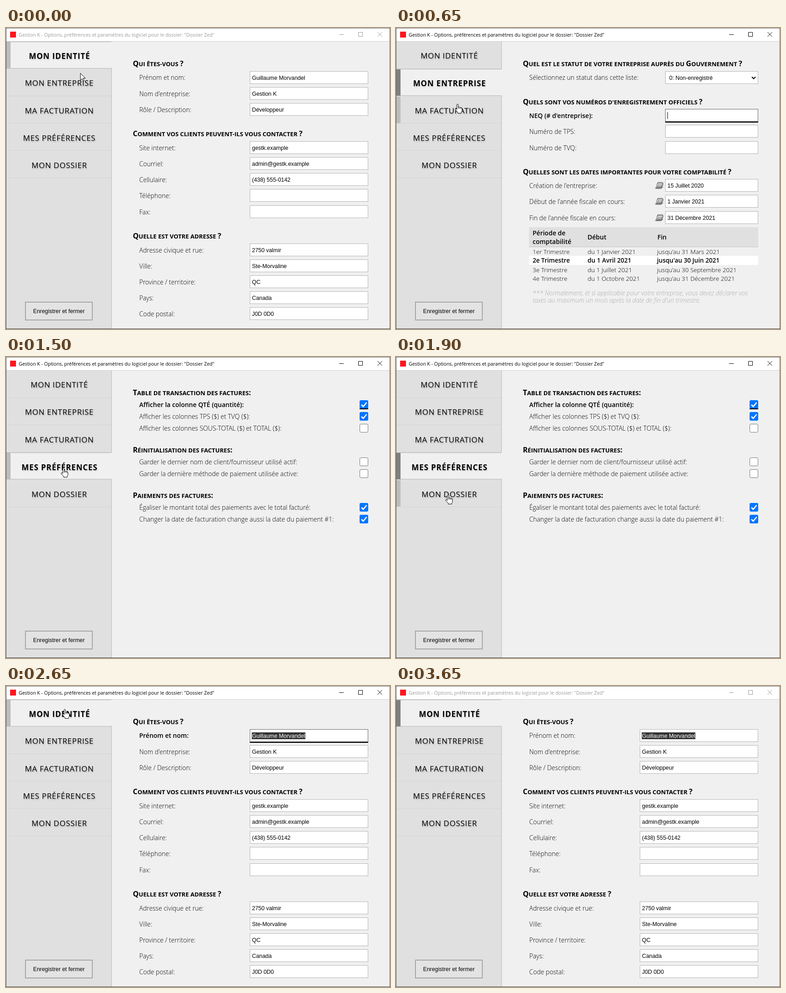
Write an HTML page that moves like this. It is 846 by 662 pixels and loops after 3750 ms.

```html
<!DOCTYPE html>
<html lang="fr">
<head>
<meta charset="utf-8">
<title>Options</title>
<style>
html, body { margin: 0; width: 100%; height: 100%; overflow: hidden; background: #f0f0f0; }
svg { display: block; width: 846px; height: 662px; }
text { font: 300 14px "Open Sans", "Noto Sans", sans-serif; white-space: pre; fill: #000; }
.title { font-size: 10.55px; font-weight: 400; }
.semi { font-weight: 600; }
.bold { font-weight: 700; }
.reg { font-weight: 400; }
.row { font-size: 13.6px; }
.small { font-size: 10.4px; }
.note { font-style: italic; fill: #aaa; }
.head { font-size: 13.15px; font-weight: 700; }
.head tspan { font-size: 16px; }
.tab { font-size: 17px; font-weight: 400; letter-spacing: .7px; text-anchor: middle; filter: drop-shadow(1px 2px 1px rgba(0,0,0,.25)); }
.tab.sel { font-weight: 700; letter-spacing: .9px; filter: drop-shadow(1px 2px 1px rgba(0,0,0,.15)); }
.field { font: 400 12.4px "Liberation Sans", Arial, sans-serif; }
.mid { text-anchor: middle; }
.end { text-anchor: end; }
.box { fill: #fff; stroke: #b4b4b4; }
.line { fill: none; stroke: #000; }
.timed { animation: 3750ms step-end infinite; }
#cursor { animation: move 3750ms linear infinite; }
</style>
</head>
<body>
<svg id="stage" viewBox="0 0 846 662"></svg>
<style id="motion"></style>
<script>
const LOOP = 3750, STEP = 50;
const APP = 'Gestion K', FILE = 'Dossier Zed', OWNER = 'Guillaume Morvandel';
let css = '', count = 0;
const pct = t => (t / LOOP * 100).toFixed(4) + '%';

// Shows the body only inside the given [start, end] spans
function during(spans, body) {
  const name = 'k' + count++;
  const stops = spans[0][0] ? ['0%{opacity:0}'] : [];
  for (const [from, to] of spans) {
    stops.push(`${pct(from)}{opacity:1}`);
    if (to < LOOP) stops.push(`${pct(to)}{opacity:0}`);
  }
  css += `@keyframes ${name}{${stops.join('')}}\n`;
  return `<g class="timed" style="animation-name:${name}">${body}</g>`;
}

const text = (x, y, s, cls = '') => `<text x="${x}" y="${y}" class="${cls}">${s}</text>`;
const rect = (x, y, w, h, fill) => `<rect x="${x}" y="${y}" width="${w}" height="${h}" fill="${fill}"/>`;
const path = (d, attrs = '') => `<path d="${d}" ${attrs}/>`;
const at = (x, y, body) => `<g transform="translate(${x} ${y})">${body}</g>`;
const label = (y, s, cls) => text(293.5, y, s, cls);
const head = (y, s) => text(279.5, y,
  s.replace(/[A-ZÉ0-9?:().]+|[^A-ZÉ0-9?:().]+/g, p => /^[A-ZÉ0-9?:().]/.test(p) ? `<tspan>${p}</tspan>` : p.toUpperCase()), 'head');
const box = (x, y, w, h = 27) => `<rect class="box" x="${x}" y="${y}" width="${w}" height="${h}"/>`;
const input = (x, y, w, s = '') => box(x, y, w) + text(x + 4.5, y + 18, s, 'field');
const select = (x, y, w, s) => box(x, y, w) + text(x + 8.5, y + 18, s, 'field') +
  path(`M${x + w - 13.5} ${y + 12}l4 4 4-4`, 'class="line" stroke-width="2"');
const focus = (x, y, w) => `<rect x="${x}" y="${y}" width="${w}" height="27" fill="none" stroke="#666"/>` +
  rect(x - .5, y + 27.5, w + 1, 2, '#000');
const check = (x, y, on) => at(x, y, on
  ? '<rect width="19" height="19" rx="3" fill="#0075ff"/>' + path('M4 10l4 4 7.5-9', 'fill="none" stroke="#fff" stroke-width="2.6"')
  : '<rect x=".5" y=".5" width="18" height="18" rx="2.5" fill="#fff" stroke="#767676"/>');
const button = (x, y, w, h, s) => rect(x, y, w, h, '#999') + rect(x + 1, y + 1, w - 2, h - 2, '#b4b4b4') +
  rect(x + 2, y + 2, w - 4, h - 4, '#e3e3e3') + text(x + w / 2, y + h / 2 + 4.5, s, 'field mid');

function identity() {
  const rows = [
    [95.5, 'Prénom et nom:', OWNER], [130.5, "Nom d'entreprise:", APP], [165.5, 'Rôle / Description:', 'Développeur'],
    [249.5, 'Site internet:', 'gestk.example'], [284.5, 'Courriel:', 'admin@gestk.example'],
    [319.5, 'Cellulaire:', '(438) 555-0142'], [354.5, 'Téléphone:', ''], [390.5, 'Fax:', ''],
    [474.5, 'Adresse civique et rue:', '2750 valmir'], [509.5, 'Ville:', 'Ste-Morvaline'],
    [544.5, 'Province / territoire:', 'QC'], [579.5, 'Pays:', 'Canada'], [614.5, 'Code postal:', 'J0D 0D0']];
  const name = rows[0][1];
  return head(84, 'Qui êtes-vous ?') + head(238, 'Comment vos clients peuvent-ils vous contacter ?') +
    head(463, 'Quelle est votre adresse ?') +
    rows.map(([y, s, v], i) => (i ? label(y + 19, s) : '') + input(537.5, y, 260, v)).join('') +
    during([[0, 2650], [3650, LOOP]], label(114, name)) +
    during([[2650, 3650]], label(114, name, 'semi') + focus(537.5, 95.5, 260)) +
    during([[2650, LOOP]], rect(541.5, 102, 118, 15, '#333') +
      `<text x="542" y="113.5" class="field" style="fill:#fff">${OWNER}</text>`);
}

const calendar = y => at(571, y,
  path('M5 3.5h12.5l-2.5 9H2.5z', 'fill="#fff" stroke="#444"') +
  path('M1 13v2.500h12.500l4-4M2 14h12l3.500-8M6.500 1v4M9.500 1v4M12.500 1v4M15.500 1v4', 'class="line" style="stroke:#444"') +
  path('M6 7.5h9M5 10.5h9', 'class="line" stroke-width="1.5" stroke-dasharray="2 1.5"'));

function company() {
  const dates = [[332.5, "Création de l'entreprise:", '15 Juillet 2020'],
    [367.5, "Début de l'année fiscale en cours:", '1 Janvier 2021'],
    [403.5, "Fin de l'année fiscale en cours:", '31 Décembre 2021']];
  const terms = [[497, '1er', '1 Janvier', '31 Mars'], [515.5, '2e', '1 Avril', '30 Juin'],
    [537, '3e', '1 Juillet', '30 Septembre'], [555.5, '4e', '1 Octobre', '31 Décembre']];
  return head(84, 'Quel est le statut de votre entreprise auprès du Gouvernement ?') +
    label(114, 'Sélectionnez un statut dans cette liste:') + select(593.5, 95.5, 204, '0: Non-enregistré') +
    head(167.5, "Quels sont vos numéros d'enregistrement officiels ?") +
    label(198, "NEQ (# d'entreprise):", 'semi') + input(593.5, 178.5, 204) + focus(593.5, 178.5, 204) +
    rect(598, 185, 1, 15, '#000') +
    label(233, 'Numéro de TPS:') + input(593.5, 213.5, 204) +
    label(268.5, 'Numéro de TVQ:') + input(593.5, 249.5, 204) +
    head(321.5, 'Quelles sont les dates importantes pour votre comptabilité ?') +
    dates.map(([y, s, v]) => label(y + 19, s) + calendar(y + 5) + input(593.5, y, 204, v)).join('') +
    rect(293, 438, 505, 43, '#e0e0e0') + rect(293, 481, 505, 1, '#c4c4c4') + rect(293, 501, 505, 20, '#fff') +
    text(301, 456, 'Période de', 'semi') + text(301, 475, 'comptabilité', 'semi') +
    text(422, 465, 'Début', 'semi') + text(576, 465, 'Fin', 'semi') +
    terms.map(([y, n, a, b], i) => {
      const cls = i === 1 ? 'row semi' : 'row';
      return text(301, y, n + ' Trimestre', cls) + text(422, y, `du ${a} 2021`, cls) + text(575, y, `jusqu'au ${b} 2021`, cls);
    }).join('') +
    text(301, 588, '*** Normalement, et si applicable pour votre entreprise, vous devez déclarer vos', 'note') +
    text(301, 603.5, "taxes au maximum un mois après la date de fin d'un trimestre.", 'note');
}

function billing() {
  const combo = (y, s, v) => label(y + 20, s) + box(457.5, y, 325, 29) + text(462, y + 19, v, 'field') +
    path(`M765.5 ${y + 12}h9l-4.5 5z`, 'fill="#ddd"');
  const picks = [[392.5, 'Préfixe:', 'Définir un préfixe personnalisé'], [462.5, 'Séparateur après le préfixe:', 'Aucun'],
    [498.5, "Inclure l'année:", 'Oui'], [533.5, "Séparateur après l'année:", "Un trait d'union -"],
    [568.5, 'Longueur minimale du numéro:', '5']];
  return head(84, "Sélectionnez votre logo d'entreprise (Hauteur max. 80 pixels) :") +
    '<rect x="292.5" y="94.5" width="491" height="93" fill="#fff" stroke="#bbb" stroke-dasharray="3 2"/>' +
    rect(505, 108, 70, 70, '#ff1420') +
    label(210, 'Afficher ce logo sur mes factures clients:') + check(764, 195, true) +
    head(258.5, 'Quelles sont vos préférences pour vos nouveaux clients ?') +
    combo(269.5, 'Taxe par défaut:', 'QC') + combo(306.5, 'Catégorie par défaut:', 'Huiles essentielles') +
    head(381, `Comment ${APP} doit-il générer vos numéros de factures ?`) +
    picks.map(([y, s, v]) => label(y + 19, s) + select(522.5, y, 260, v)).join('') +
    label(446, 'Préfixe personnalisé:') + input(522.5, 427.5, 260, 'FE') +
    label(619, 'Exemple du numéro qui sera généré automatiquement:') + text(782.5, 619, 'FE2021-00001', 'bold end') +
    head(667.5, 'Pour vos factures imprimées, quelles informations de contact') +
    rect(830, 30, 15, 631, '#e3e3e3') +
    '<rect x="830.5" y="30.5" width="14" height="269" fill="#adadad" stroke="#555"/>';
}

function preferences() {
  const rows = [[95, 'Afficher la colonne QTÉ (quantité):', 1], [121, 'Afficher les colonnes TPS ($) et TVQ ($):', 1],
    [147, 'Afficher les colonnes SOUS-TOTAL ($) et TOTAL ($):', 0],
    [221, 'Garder le dernier nom de client/fournisseur utilisé actif:', 0],
    [247, 'Garder la dernière méthode de paiement utilisée active:', 0],
    [321, 'Égaliser le montant total des paiements avec le total facturé:', 1],
    [347, 'Changer la date de facturation change aussi la date du paiement #1:', 1]];
  return head(84, 'Table de transaction des factures:') + head(210, 'Réinitialisation des factures:') +
    head(310, 'Paiements des factures:') +
    rows.map(([y, s, on], i) => label(y + 14.5, s, i ? '' : 'semi') + check(779, y, on)).join('') +
    rect(779, 113, 19, 2, '#000');
}

function folder() {
  const facts = ['Nom :  ' + FILE, 'Courriel associé :  guillaume_m_4@box.example',
    'Date de création :  mardi 26 janvier 2021 19:39', 'Clients :  7', 'Factures de revenus :  15',
    'Fournisseurs :  7', 'Factures de dépenses :  30'];
  const copies = [['2021-06-13 à 09_20_07', 'v1.0.4 with passwordMemo'],
    ['2021-02-08 à 11_47_55', 'v0.9.6 to test migration to 0.9.7'],
    ['2021-02-01 à 09_12_23', 'v0.9.5 transactions are ARRAYS']];
  const pad = (x, w) => `<rect x="${x}" y="-17" width="${w}" height="33" rx="4" fill="#f7f7f7"/>`;
  const tools = pad(642, 39) + pad(689, 43) + pad(739, 43) +
    path('M656.5-5.5A7.3 7.3 0 1 1 657 5', 'class="line" stroke-width="2.4"') + path('M653.5-9v8h8z') +
    path('M706-4.5v11.5h10.5v-11.5M704-5.5h14.5M708.5-6v-2.5h5.5v2.5M709.5-2v6M713-2v6', 'class="line" stroke-width="1.5"') +
    path('M759-9.5h5v8h4.5l-7 7.5-7-7.5h4.5zM755 7.5h13v2h-13z');
  return head(84, `Dossier de tenue de livres ${APP} :`) +
    facts.map((s, i) => label(110 + i * 19.5, s, 'reg')).join('') +
    at(425, 96, path('M1 14l1-4.5L10.5 1l3.5 3.5L5.5 13zM8.5 3l3.5 3.5', 'class="line" stroke-width="1.7"')) +
    head(275.5, 'Copies de sauvegardes de ce dossier :') +
    '<circle cx="788.5" cy="270" r="8.7" class="line" stroke-width="1.6"/>' + text(788.5, 275, '?', 'semi mid') +
    rect(293, 287, 505, 24, '#e0e0e0') + rect(293, 311, 505, 139, '#fff') +
    text(301, 304, 'Date', 'semi') + text(431, 304, 'Description', 'semi') + text(687, 304, 'Actions', 'semi') +
    copies.map(([d, s], i) => at(0, 335 + i * 46.3, text(301, 4, d, 'small') + text(431, 4, s, 'small') + tools)).join('') +
    button(292, 457, 259, 27, 'Créer une nouvelle copie de sauvegarde') +
    path('M279.5 546.5l8.5 4.5-8.5 4.5z') + text(295, 556, 'Afficher la section avancée', 'reg');
}

// Name, page, spans when open, spans when hovered
const tabs = [
  ['MON IDENTITÉ', identity, [[0, 450], [2600, LOOP]], [[0, 50], [2350, 2800]]],
  ['MON ENTREPRISE', company, [[450, 950]], [[50, 600], [2250, 2350], [2800, 2850]]],
  ['MA FACTURATION', billing, [[950, 1500]], [[600, 1250], [2200, 2250]]],
  ['MES PRÉFÉRENCES', preferences, [[1500, 2000]], [[1250, 1700], [2100, 2200], [2850, 2900]]],
  ['MON DOSSIER', folder, [[2000, 2600]], [[1700, 2100], [2900, 2950]]]];

function sidebar() {
  const plain = tabs.map(([name], i) => rect(1, 89 + i * 60, 231, 1, '#d4d4d4') + text(117.5, 67 + i * 60.25, name, 'tab'));
  const open = tabs.map(([name, , spans], i) => {
    const y = 30 + i * 60;
    return during(spans, rect(1, y, 232, 59, '#f0f0f0') + rect(1, y, 231, 1, '#b4b4b4') + rect(10, y + 58, 223, 1, '#c4c4c4') +
      rect(1, y + 1, 9, 58, '#808080') + text(118, 68 + i * 60.25, name, 'tab sel'));
  });
  const hover = tabs.map(([, , , spans], i) => during(spans, rect(1, 31 + i * 60, 9, 58, '#bdbdbd')));
  return rect(1, 30, 231, 631, '#e0e0e0') + rect(232, 30, 1, 631, '#b8b8b8') +
    [...plain, ...open, ...hover].join('') + button(42, 602, 149, 41, 'Enregistrer et fermer');
}

function titleBar() {
  const bar = color => `<text x="28" y="18.5" class="title" style="fill:${color}">${APP} - Options, préférences et paramètres du logiciel pour le dossier: "${FILE}"</text>` +
    path('M734 14.5h10M776.5 9.5h9v9h-9zM818.5 9l10 10M828.5 9l-10 10', `fill="none" stroke="${color}"`);
  return rect(0, 0, 846, 29, '#fff') + rect(0, 29, 846, 1, '#d0d0d0') + rect(9, 8, 13, 13, '#ff1420') +
    during([[0, 400], [3650, LOOP]], bar('#999')) + during([[400, 3650]], bar('#000'));
}

// Time, x and y of the pointer tip
const route = [[0, 163.5, 99], [50, 160, 106], [150, 148, 122], [450, 148, 122], [650, 137, 168], [800, 136, 187],
  [1150, 136, 187], [1400, 128, 245], [1550, 128, 245], [1900, 116, 304], [2050, 116, 304], [2300, 127, 95],
  [2500, 131, 52], [2750, 131, 52], [3100, 124, 638], [LOOP, 124, 638]];
css += '@keyframes move{' + route.map(([t, x, y], i) => {
  const n = i + 1 < route.length ? (route[i + 1][0] - t) / STEP : 1;
  return `${pct(t)}{transform:translate(${x}px,${y}px);animation-timing-function:steps(${n})}`;
}).join('') + '}';

const ink = 'fill="#fff" stroke="#000" stroke-linejoin="round"';
const hand = at(-7, -1, path('M4 12.5V2a1.6 1.6 0 0 1 3.2 0v5.2q1.6-1 3 .4q1.6-.8 2.8 .6q2.4-.6 2.4 1.6v5q0 2-1.6 3.6v2H6v-2L.8 13q-1.2-2 .6-2.6t2.6 2.1z', ink) +
  path('M7.2 6.5v4M10.2 7.6v3M13 8.2v2.5', 'class="line"'));
const arrow = path('M.5.5v15.5l3.6-3.5 2.4 5.5 2.3-1-2.4-5.4h5z', ink);

document.getElementById('stage').innerHTML = rect(0, 0, 846, 662, '#f0f0f0') + sidebar() +
  tabs.map(([, page, spans]) => during(spans, page())).join('') + titleBar() +
  rect(0, 0, 846, 1, '#777') + rect(0, 0, 1, 662, '#666') + rect(845, 0, 1, 662, '#777') + rect(0, 661, 846, 1, '#444') +
  '<g id="cursor">' + during([[50, 2950]], hand) + during([[0, 50], [2950, 3150]], arrow) + '</g>';
document.getElementById('motion').textContent = css;
</script>
</body>
</html>
```
